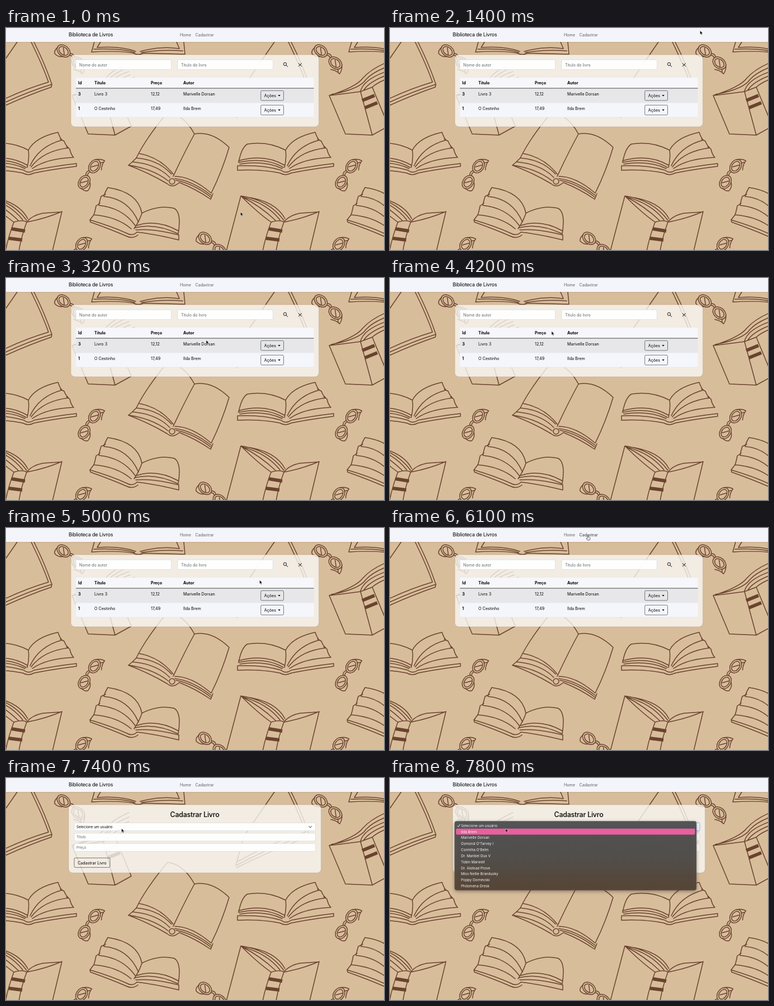
Recreate the animation shown at these times as an HTML page. Size 676 px wide and 398 px high, loop 8 s.

```html
<!DOCTYPE html>
<html lang="pt-BR">
<head>
<meta charset="utf-8">
<title>Biblioteca de Livros</title>
<style>
  html, body { margin: 0; width: 100%; height: 100%; overflow: hidden; background: #d8bd9b; }
  svg { display: block; font-family: Inter, "Open Sans", sans-serif; font-size: 7.15px; fill: #000; }
  .ink { fill: none; stroke: #6a432f; stroke-width: 1.5; stroke-linecap: round; stroke-linejoin: round; }
  .band { stroke-width: 6; stroke-linecap: butt; }
  .panel { fill: #fafaf8; fill-opacity: .78; stroke: #5a3c1e; stroke-opacity: .13; stroke-width: 1.2; }
  .field { fill: #fff; fill-opacity: .93; stroke: #ced4da; stroke-width: .6; }
  .button { fill: none; stroke: #212529; stroke-width: .6; }
  .hint { fill: #5f666d; }
  .small { font-size: 6.35px; }
  .bold { font-weight: 700; }
  .link { fill: #5b5c5f; }
  .link.hover { fill: #303134; }
  .icon { fill: none; stroke: #111; stroke-width: 1; }
  .menu text { font-size: 6.4px; fill: #f4f4f4; }
</style>
</head>
<body>
<svg width="676" height="398" viewBox="0 0 676 398">
  <defs>
    <linearGradient id="dark" x1="0" y1="0" x2="0" y2="1">
      <stop offset="0" stop-color="#505253"/>
      <stop offset=".55" stop-color="#504c48"/>
      <stop offset="1" stop-color="#554434"/>
    </linearGradient>
    <g id="glasses">
      <ellipse cx="-17" rx="13" ry="9.5"/>
      <ellipse cx="-17" rx="9.5" ry="6.5"/>
      <ellipse cx="17" rx="13" ry="9.5"/>
      <ellipse cx="17" rx="9.5" ry="6.5"/>
      <path d="M-5-4Q0-8 5-4M-4-1Q0-4 4-1M28-5Q35 2 35 10Q27 9 18 14M27 5L31 9M-29 2Q-31 10-26 14Q-17 15-12 9M-21-4L-12 4M13-4L22 4"/>
    </g>
    <g id="tile" class="ink">
      <!-- wide open book -->
      <path d="M416 241Q421 214 432 208Q468 202 500 219Q512 196 553 187Q556 196 560 201Q519 212 503 247M500 219Q502 234 498 250M557 199L564 203Q567 211 572 215Q527 220 505 249M568 213L574 217Q576 227 581 232Q532 234 507 252M416 241Q464 231 496 250M416 238Q462 225 498 246M418 244Q462 237 494 252"/>
      <path d="M414 247Q460 245 492 255Q500 262 510 255Q550 247 586 243L586 248Q545 253 510 260Q500 266 490 260Q455 253 414 255Z"/>
      <!-- large tilted book -->
      <path d="M233 233Q250 198 289 151Q318 155 337 190Q368 184 399 214Q386 258 367 296M337 190Q318 225 299 266M233 233Q272 236 296 262M302 266Q332 266 367 296M233 233L226 240Q270 244 293 268M226 240L219 246Q262 252 290 274M238 225Q276 232 299 262M302 270Q332 273 367 300"/>
      <path d="M219 246Q258 261 288 279Q298 288 310 277Q340 289 366 307L370 297M304 273Q335 279 366 303"/>
      <circle cx="297" cy="275" r="5"/>
      <!-- fanned open book -->
      <path d="M243 332Q236 294 182 286Q177 294 175 302Q219 306 237 348M243 332Q272 317 300 323Q309 327 310 345Q310 358 308 369M243 332Q239 345 229 360M178 298L170 302Q167 312 166 318Q208 322 231 354M168 314L161 319Q159 330 157 335Q198 338 224 360M308 369Q266 349 231 358M309 364Q270 342 234 354"/>
      <path d="M157 335L150 344Q190 356 216 368Q226 374 234 366Q270 370 309 380L309 371Q262 359 232 362M150 344L151 348Q190 362 215 373Q226 379 236 371"/>
      <!-- standing book -->
      <path d="M420 301L394 400M420 301Q450 331 474 348Q464 375 459 400M474 348Q490 343 497 348Q487 375 483 400M497 348Q530 342 560 329L543 400M420 301Q470 308 497 345M423 303Q466 314 490 344M430 303Q482 310 499 342M421 302Q456 320 482 345M497 348Q506 336 526 332L556 330"/>
      <path class="band" d="M470 360L494 364M465 377L489 380"/>
      <!-- leaning book -->
      <path d="M578 121L607 190L655 192L634 114Q605 118 578 121M655 192L684 176L655 106Q645 110 634 114M578 121Q626 106 638 90Q652 74 680 62M582 119Q632 110 644 92Q655 80 680 70M634 113Q640 92 680 78M640 111Q650 96 682 84M655 106Q666 96 690 88"/>
      <path class="band" d="M637 130L659 121M642 143L664 134"/>
      <!-- cropped books along the top -->
      <path d="M50 25Q70 65 82 101Q20 120-49 157L-35 105L20 25M45 25Q65 66 76 97Q15 115-46 150M82 101L81 106Q25 125-48 161"/>
      <path d="M158 25L153 43Q200 40 228 45Q236 50 246 45L320 47L318 25M169 25L163 35Q205 32 232 42M157 38Q205 36 230 44M240 42Q276 32 310 37L305 25M242 44Q280 38 316 41"/>
      <use href="#glasses" transform="translate(149 262)rotate(-57)"/>
      <use href="#glasses" transform="translate(126 402)rotate(-57)"/>
      <use href="#glasses" transform="translate(576 52)rotate(40)"/>
      <use href="#glasses" transform="translate(369 388)rotate(40)"/>
    </g>
  </defs>

  <rect width="676" height="398" fill="#d8bd9b"/>
  <use href="#tile" x="-460"/>
  <use href="#tile"/>
  <use href="#tile" x="460"/>

  <rect width="676" height="25" fill="#f4f5fa" style="filter:drop-shadow(0 .7px 1.5px rgba(0,0,0,.2))"/>
  <text x="112" y="15" font-size="9" letter-spacing="-.2">Biblioteca de Livros</text>
  <text x="311" y="14.6" class="link">Home</text>
  <text x="338.5" y="14.6" class="link" id="register">Cadastrar</text>

  <g id="list">
    <rect class="panel" x="116" y="48" width="443.5" height="129" rx="7"/>
    <rect class="field" x="125" y="57" width="170.5" height="17.5" rx="2"/>
    <rect class="field" x="307" y="57" width="170.5" height="17.5" rx="2"/>
    <text class="hint" x="131" y="68.6">Nome do autor</text>
    <text class="hint" x="313" y="68.6">Título do livro</text>
    <g class="icon">
      <circle cx="499" cy="64.7" r="2.7"/>
      <path d="M501 66.7L504.2 69.9M523 63.1L528.8 68.9M528.8 63.1L523 68.9"/>
    </g>
    <rect x="125" y="89" width="425.5" height="19" fill="#f6f6fb"/>
    <rect x="125" y="108" width="425.5" height="26" fill="#e7e7ea"/>
    <rect x="125" y="134" width="425.5" height="26" fill="#f5f6fb"/>
    <path d="M125 108H550.5" stroke="#33363a" stroke-width=".9"/>
    <path d="M125 134H550.5M125 160H550.5" stroke="#dee2e6" stroke-width=".5"/>
    <g id="rows"></g>
  </g>

  <g id="form">
    <rect class="panel" x="112" y="48" width="451.5" height="122" rx="7"/>
    <text x="337.5" y="69.7" text-anchor="middle" font-size="12.4" font-weight="500" letter-spacing="-.2">Cadastrar Livro</text>
    <g class="small">
      <rect class="field" id="select" x="122" y="80.5" width="431.5" height="14" rx="2"/>
      <rect class="field" x="122" y="99" width="431.5" height="14" rx="2"/>
      <rect class="field" x="122" y="117.5" width="431.5" height="14" rx="2"/>
      <text x="126" y="89.9">Selecione um usuário</text>
      <text class="hint" x="126" y="108.3">Título</text>
      <text class="hint" x="126" y="126.8">Preço</text>
      <path class="icon" d="M541.6 86.4L544.1 88.9L546.6 86.4"/>
    </g>
    <rect class="button" x="122" y="143.3" width="64" height="17" rx="2"/>
    <text x="154" y="154.5" text-anchor="middle">Cadastrar Livro</text>
  </g>

  <g id="menu" class="menu">
    <rect x="115.5" y="77.3" width="432.5" height="124" rx="4" fill="url(#dark)" fill-opacity=".98"
      stroke="#77716b" stroke-width=".5" style="filter:drop-shadow(0 2px 3px rgba(0,0,0,.35))"/>
    <rect x="118" y="90.8" width="427.5" height="10.6" rx="2" fill="#ea5f9f"/>
    <path d="M120.5 85.6L122.2 87.7L125.2 82.8" fill="none" stroke="#fff" stroke-width=".9"/>
  </g>

  <path id="arrow" d="M0 0V6.7L1.6 5.3L2.7 7.8L3.9 7.3L2.8 4.8H4.9Z" fill="#000" stroke="#fff" stroke-width=".5"/>
  <path id="hand" d="M-.8 4V.4Q-.8-.5 0-.5Q.8-.5.8.4V2.6Q1.6 2 2.1 2.9Q2.9 2.5 3.2 3.3Q4 3.2 4 4.1V5.6L3.2 7.6H-.6L-2.6 4.6Q-2.4 3.4-.8 4.7Z"
    fill="#fff" stroke="#111" stroke-width=".65"/>
</svg>
<script>
  const $ = id => document.getElementById(id);
  const text = (x, y, words, cls = '') => `<text x="${x}" y="${y}" class="${cls}">${words}</text>`;

  const columns = [129, 158, 259, 317];
  const tableRow = (cells, y, bold) =>
    cells.map((cell, i) => text(columns[i], y, cell, bold || i === 0 ? 'bold' : '')).join('');
  const actions = y => `<rect class="button" x="455.7" y="${y}" width="40.8" height="17.6" rx="2"/>`
    + text(461.8, y + 11.4, 'Ações') + `<path d="M486.4 ${y + 7.8}h4.4l-2.2 2.3z"/>`;

  $('rows').innerHTML = tableRow(['Id', 'Título', 'Preço', 'Autor'], 101.4, true)
    + tableRow(['3', 'Livro 3', '12,12', 'Marivelle Dorsan'], 120.6) + actions(112.3)
    + tableRow(['1', 'O Cestinho', '17,49', 'Ilda Brem'], 146.6) + actions(138.3);

  const options = ['Selecione um usuário', 'Ilda Brem', 'Marivelle Dorsan', "Osmond O'Tarvey I",
    "Corintha O'Belm", 'Dr. Maribel Oux V', 'Tobin Marwell', 'Dr. Alstead Prove',
    'Miss Nellie Brandusky', 'Poppy Dornevski', 'Philomena Dresk'];
  $('menu').insertAdjacentHTML('beforeend',
    options.map((name, i) => text(127, 87.7 + i * 10.84, name)).join(''));

  // pointer stops: time, x, y
  const stops = [
    [0, 419.5, 330], [900, 560, 60], [1400, 554.5, 4.8], [1800, 500, 95], [2100, 500, 95],
    [3000, 361, 114], [3200, 358, 111.5], [3600, 358, 111.5], [4000, 258, 92], [4500, 346, 102],
    [4800, 443, 102], [4900, 443, 102], [5000, 453.5, 93.5], [5100, 494, 66], [5400, 238, 36],
    [5500, 238, 36], [6100, 353.8, 14], [6800, 353.8, 14], [7100, 191, 96], [7400, 206.7, 90.6],
    [8000, 206.7, 90.6]
  ];

  function pointerAt(t) {
    const i = stops.findIndex(s => s[0] > t);
    const [t0, x0, y0] = stops[i - 1], [t1, x1, y1] = stops[i];
    const k = (t - t0) / (t1 - t0), e = k * k * (3 - 2 * k);
    return [x0 + (x1 - x0) * e, y0 + (y1 - y0) * e];
  }

  const show = (id, on) => $(id).setAttribute('visibility', on ? 'visible' : 'hidden');

  function render(ms) {
    const t = Math.floor(ms % 8000 / 100) * 100;
    const [x, y] = pointerAt(t);
    const overLink = x > 338 && x < 373 && y > 8 && y < 19;
    const focused = t >= 7600;
    show('list', t < 6500);
    show('form', t >= 6500);
    show('menu', t >= 7700);
    show('arrow', !overLink);
    show('hand', overLink);
    $('register').classList.toggle('hover', overLink);
    $('select').style.cssText = focused ? 'stroke:#86b7fe;filter:drop-shadow(0 0 1px #6ea8fe)' : '';
    for (const id of ['arrow', 'hand']) $(id).setAttribute('transform', `translate(${x} ${y})`);
  }

  const start = performance.now();
  function tick() {
    render(performance.now() - start);
    requestAnimationFrame(tick);
  }
  tick();
</script>
</body>
</html>
```
